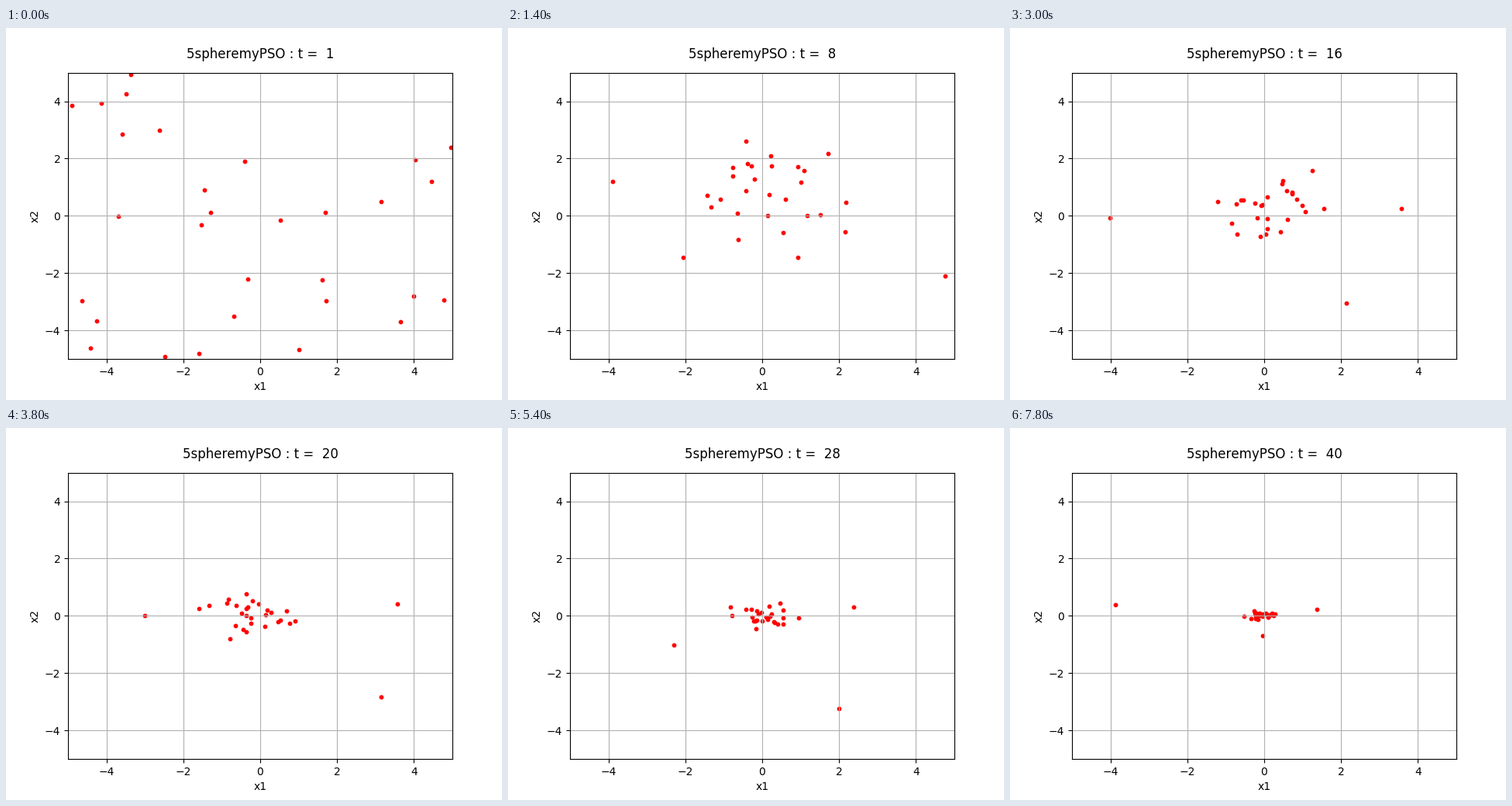
These frames come from a looping animation (640 px wide and 480 px high, 8000 ms). A matplotlib script:

```python
import numpy as np
import matplotlib.pyplot as plt
from matplotlib.animation import FuncAnimation

STEPS = 40
COUNT = 27
LIMIT = 4.96

rng = np.random.default_rng(11)
home = rng.uniform(-LIMIT, LIMIT, (COUNT, 2))
reach = 1.3 * rng.lognormal(0, 0.4, (COUNT, 2))
speed = rng.uniform(0.5, 1.4, (COUNT, 2))
phase = rng.uniform(0, 2 * np.pi, (COUNT, 2))

# three lone particles that roam outside the swarm
KEYS = [1, 8, 13, 20, 24, 33, 40]
ROAMERS = [
    [(-4.9, 3.85), (-3.9, 1.2), (-2.8, -0.1), (-3.0, 0), (-2.1, 0),
     (-1.1, -1.65), (-3.88, 0.38)],
    [(4.95, 2.4), (4.75, -2.1), (1.82, 0), (3.57, 0.41), (1.98, 0.36),
     (1.35, 0.03), (1.37, 0.22)],
    [(-2.48, -4.92), (-2.05, -1.45), (0.33, -1.72), (3.15, -2.84),
     (1.05, -2.83), (1.9, -1.67), (-0.04, -0.7)],
]


def flock(t):
    """Particles circling a shrinking region around the optimum."""
    age = t - 8
    spread = np.exp([-0.05 * age, -0.09 * age]) * (1.0, 1.1)
    center = (0, 0.5 * np.exp(-0.15 * age))
    orbit = center + spread * reach * np.sin(speed * t + phase)
    u = min((t - 1) / 7, 1)
    ease = u * u * (3 - 2 * u)
    return home + ease * (orbit - home)


def roam(t, track):
    """Straight legs between key points, swinging outward midway."""
    x, y = zip(*track)
    leg = np.interp(t, KEYS, range(len(KEYS)))
    swing = 1 + 0.4 * np.sin(np.pi * (leg % 1))
    return swing * np.interp(t, KEYS, x), swing * np.interp(t, KEYS, y)


def swarm(t):
    pts = np.vstack([flock(t), [roam(t, track) for track in ROAMERS]])
    return np.clip(pts, -LIMIT, LIMIT)


plt.rcParams["text.kerning_factor"] = 6     # whole-pixel letter spacing
fig, ax = plt.subplots(figsize=(6.4, 4.8), dpi=100)
ax.set(xlim=(-5, 5), ylim=(-5, 5), xlabel="x1", ylabel="x2")
ax.grid(True)
dots = ax.scatter([], [], s=10, c="red")
title = ax.text(0.5, 1.05, "", ha="center", fontsize=12,
                transform=ax.transAxes)


def update(i):
    t = i + 1
    dots.set_offsets(swarm(t))
    title.set_text(f"5spheremyPSO : t =  {t}")
    return dots, title


anim = FuncAnimation(fig, update, frames=STEPS, interval=200, repeat=True,
                     repeat_delay=0, init_func=lambda: update(0))
plt.show()
```
